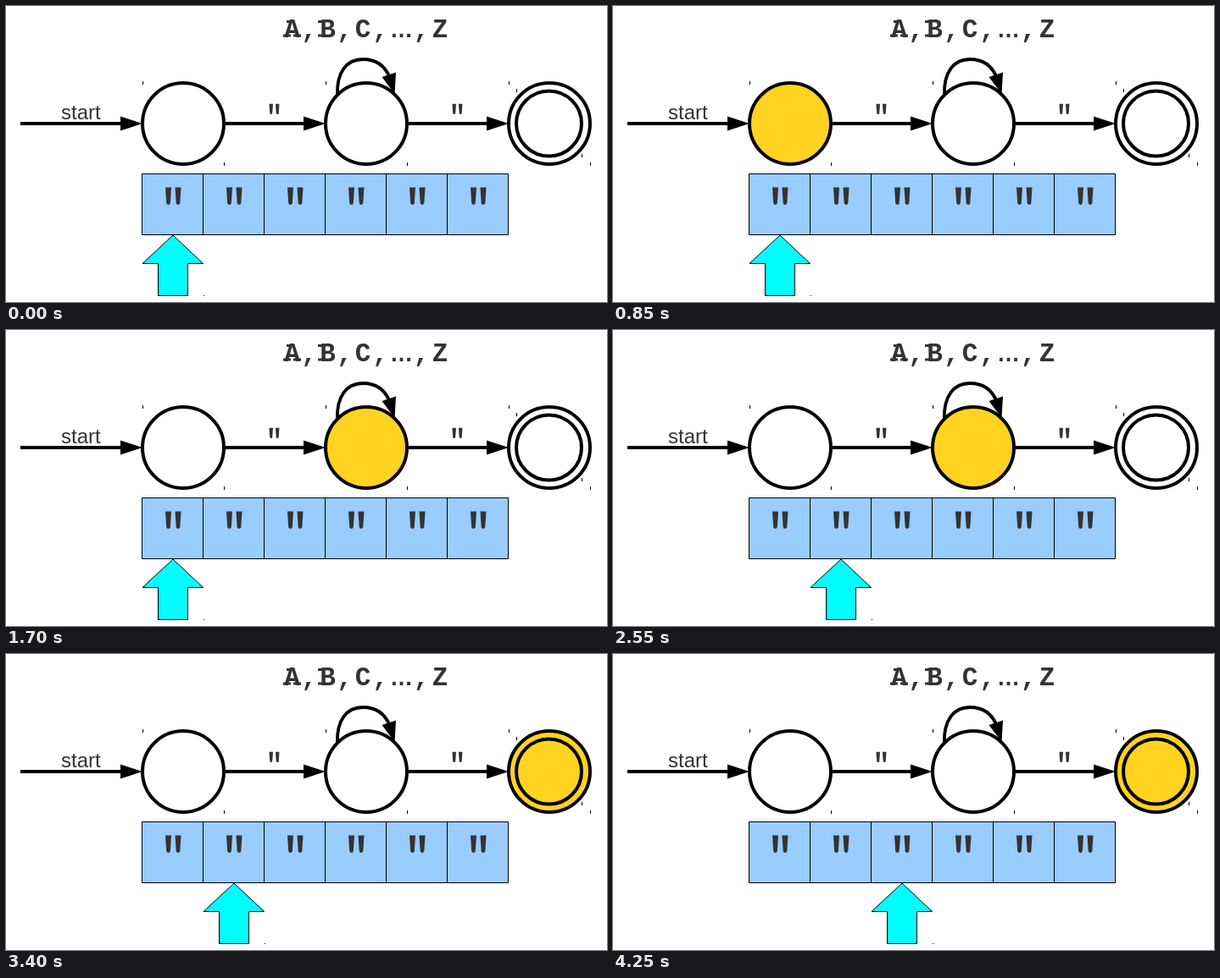
An HTML page that plays this animation: 709x350 px, repeating every 5100 ms.

```html
<!DOCTYPE html>
<html lang="en">
<head>
<meta charset="utf-8">
<title>Automaton reading a tape</title>
<style>
  html, body { margin: 0; width: 100%; height: 100%; overflow: hidden; background: #fff; }
  svg { display: block; width: 709px; height: 350px; }

  .ring { fill: #fff; stroke: #000; stroke-width: 4; }
  .edge { fill: none; stroke: #000; stroke-width: 3.8; }
  .ink { fill: #333; }
  .slab { fill: none; stroke: #333; stroke-width: 3; }
  .tape { fill: #9cf; stroke: #000; }
  .ticks { stroke: #000; }
  .label { font: 24px "Liberation Sans", Arial, sans-serif; }
  .letters { font: bold 31px "Liberation Mono", monospace; text-anchor: middle; }
  .dots { font: bold 27px "Liberation Sans", Arial, sans-serif; }

  .first, .second, .third, .pointer { animation: 5.1s step-end infinite; }
  .first { animation-name: first; }
  .second { animation-name: second; }
  .third { animation-name: third; }
  .pointer { animation-name: advance; }

  @keyframes first { 0% { fill: #fff } 16.666% { fill: #ffd320 } 33.333%, 100% { fill: #fff } }
  @keyframes second { 0% { fill: #fff } 33.333% { fill: #ffd320 } 66.666%, 100% { fill: #fff } }
  @keyframes third { 0% { fill: #fff } 66.666%, 100% { fill: #ffd320 } }
  @keyframes advance {
    0% { transform: translateX(0) }
    50% { transform: translateX(72px) }
    83.333%, 100% { transform: translateX(144px) }
  }
</style>
</head>
<body>
<svg viewBox="0 0 709 350">
  <defs>
    <path id="head" d="M0 0L-26 -8.5V8.5Z"/>
    <path id="quote" d="M-9 -10.5H-2L-3.2 8Q-3.5 10 -5.5 10T-7.8 8ZM2.5 -10.5H9.5L8.3 8Q8 10 6 10T3.7 8Z"/>
  </defs>

  <!-- transitions -->
  <path class="edge" d="M17 139H140M257 139H356M473 139H572"/>
  <use href="#head" x="161" y="139"/>
  <use href="#head" x="377" y="139"/>
  <use href="#head" x="593" y="139"/>
  <path class="edge" d="M391 105C390 78 402 63 421 63C437 63 447 71 452.500 84"/>
  <path d="M458.500 104L443.500 84L460 78.500Z"/>

  <!-- states -->
  <circle class="ring first" cx="209" cy="139" r="48"/>
  <circle class="ring second" cx="425" cy="139" r="48"/>
  <circle class="ring third" cx="641" cy="139" r="48"/>
  <circle class="ring third" cx="640.500" cy="139" r="38.500"/>
  <path class="ticks" d="M161.500 89v4M377.500 89v4M593.500 89v4M257.500 185v4M473.500 185v4M689.500 185v4M602.500 98v4M679.500 175v4"/>

  <!-- labels -->
  <text class="ink label" x="65" y="134">start</text>
  <g class="ink letters">
    <text y="36.500" x="337.500 357.500 379.500 399.500 421 441.500">A,B,C,</text>
    <text class="dots" x="466.500" y="36.500">…</text>
    <text y="36.500" x="490 512">,Z</text>
  </g>
  <path class="slab" d="M327 35H336M339 35H348M331 18.500H338M368 18.500H373M368 35H373"/>
  <g class="ink">
    <use href="#quote" transform="translate(316.300 122) scale(.65 .6)"/>
    <use href="#quote" transform="translate(532.300 122) scale(.65 .6)"/>
  </g>

  <!-- tape -->
  <path class="tape" d="M160.500 198.500H592.500V270.500H160.500ZM232.500 198.500v72m72 0v-72m72 0v72m72 0v-72m72 0v72"/>
  <g class="ink">
    <use href="#quote" x="197" y="225"/>
    <use href="#quote" x="269" y="225"/>
    <use href="#quote" x="341" y="225"/>
    <use href="#quote" x="413" y="225"/>
    <use href="#quote" x="485" y="225"/>
    <use href="#quote" x="557" y="225"/>
  </g>

  <g class="pointer">
    <path d="M197 271L232.500 304.500H214.500V342.500H179.500V304.500H161Z" fill="#0ff" stroke="#000"/>
    <path class="ticks" d="M233 342.500h1"/>
  </g>
</svg>
</body>
</html>
```
